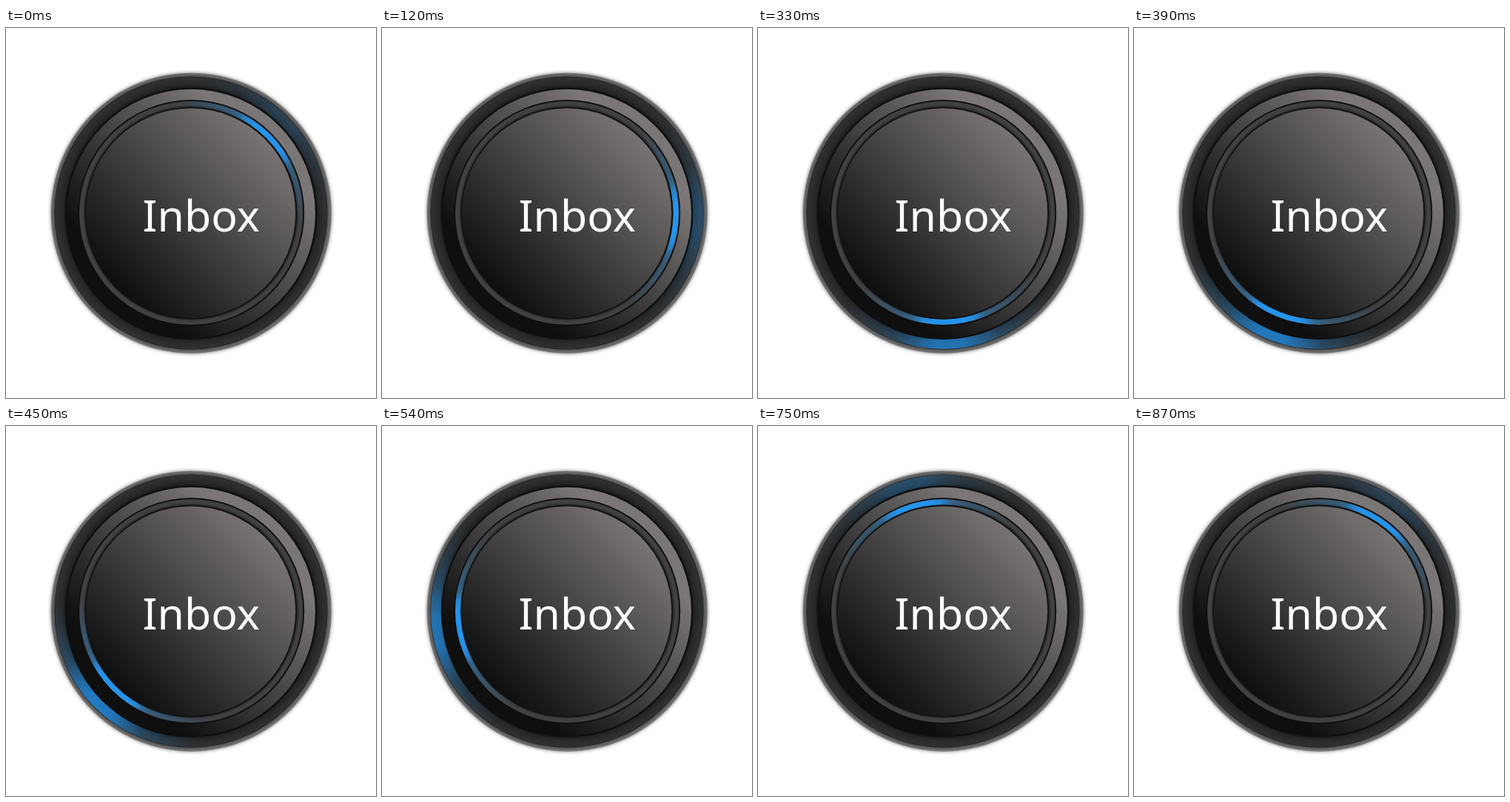
Recreate the animation shown at these times as an HTML page with a canvas. Size 500 by 500 pixels, loop 0.9 s.

```html
<!DOCTYPE html>
<html lang="en">
<head>
<meta charset="utf-8">
<title>Inbox button</title>
<style>
  html, body { margin: 0; width: 100%; height: 100%; overflow: hidden; background: #fff; }
  canvas { display: block; width: 500px; height: 500px; }
</style>
</head>
<body>
<canvas id="stage" width="500" height="500"></canvas>
<script>
const ctx = document.getElementById('stage').getContext('2d');
const C = 250;
const LOOP = 900, STEP = 30;
const START = -45, TURN = 12;
const rad = deg => deg * Math.PI / 180;

function addStops(gradient, stops) {
  for (const [offset, color] of stops) gradient.addColorStop(offset, color);
  return gradient;
}

function disc(r, fill, x = C, y = C) {
  ctx.fillStyle = fill;
  ctx.beginPath();
  ctx.arc(x, y, r, 0, 2 * Math.PI);
  ctx.fill();
}

// Diagonal shade from lower left to upper right
function diagonal(reach, ...colors) {
  const g = ctx.createLinearGradient(C - reach, C + reach, C + reach, C - reach);
  return addStops(g, colors.map((c, i) => [i / (colors.length - 1), c]));
}

function radial(inner, outer, stops) {
  return addStops(ctx.createRadialGradient(C, C, inner, C, C, outer), stops);
}

// Profile entries: [degrees from the centre of the glow, opacity]
function glow(r, width, angle, rgb, strength, profile) {
  const g = ctx.createConicGradient(rad(angle - 60), C, C);
  for (const [deg, alpha] of profile) {
    const color = `rgba(${rgb},${alpha * strength})`;
    g.addColorStop((60 - deg) / 360, color);
    g.addColorStop((60 + deg) / 360, color);
  }
  ctx.strokeStyle = g;
  ctx.lineWidth = width;
  ctx.beginPath();
  ctx.arc(C, C, r, 0, 2 * Math.PI);
  ctx.stroke();
}

const rimShade = radial(183, 190, [[0, '#404040'], [0.45, '#5e5e5e'], [1, '#7c7c7c']]);
const bandShade = radial(169, 184.5, [[0, '#1a1a1a'], [0.3, '#272727'], [0.88, '#313131'], [1, '#222']]);
const plateShade = diagonal(88, '#0f0f0f', '#434141', '#7a7676');
const ringShade = radial(143, 153, [[0, '#282828'], [0.35, '#414141'], [0.7, '#414141'], [1, '#1e1e1e']]);
const faceShade = diagonal(101, '#0e0e0e', '#434141', '#787473');

const BAND_GLOW = [[6, 1], [14, 0.72], [22, 0.38], [33, 0.18], [48, 0]];
const RING_GLOW = [[9, 1], [14, 0.85], [19, 0.45], [24, 0.3], [35, 0.2], [52, 0]];

function draw(time) {
  const angle = START + TURN * Math.floor((time % LOOP) / STEP);

  ctx.fillStyle = '#fff';
  ctx.fillRect(0, 0, 500, 500);

  ctx.save();
  ctx.shadowColor = 'rgba(0,0,0,0.55)';
  ctx.shadowBlur = 5;
  disc(189.5, rimShade, 250.3, 250.2);
  ctx.restore();

  disc(184.5, bandShade);
  // The outer band catches most light at the lower left
  const strength = 0.52 + 0.32 * Math.cos(rad(angle - 130));
  glow(177, 14, angle, '32,136,218', strength, BAND_GLOW);

  disc(170.3, '#0f0f0f', C, 250.8);
  disc(168, plateShade, C, 250.8);

  disc(153, '#0f0f0f', 250.2);
  disc(151.2, ringShade, 250.2);
  glow(147.3, 7.3, angle, '36,150,240', 0.97, RING_GLOW);

  disc(143.6, '#131313', 249.8, 250.2);
  disc(141.6, faceShade, 249.6, 250.2);

  ctx.fillStyle = '#fff';
  ctx.font = '59px "Noto Sans", sans-serif';
  ctx.textBaseline = 'alphabetic';
  ctx.fillText('Inbox', 184.5, 275);
}

const origin = performance.now();
function tick() {
  draw(performance.now() - origin);
  requestAnimationFrame(tick);
}
tick();
</script>
</body>
</html>
```
